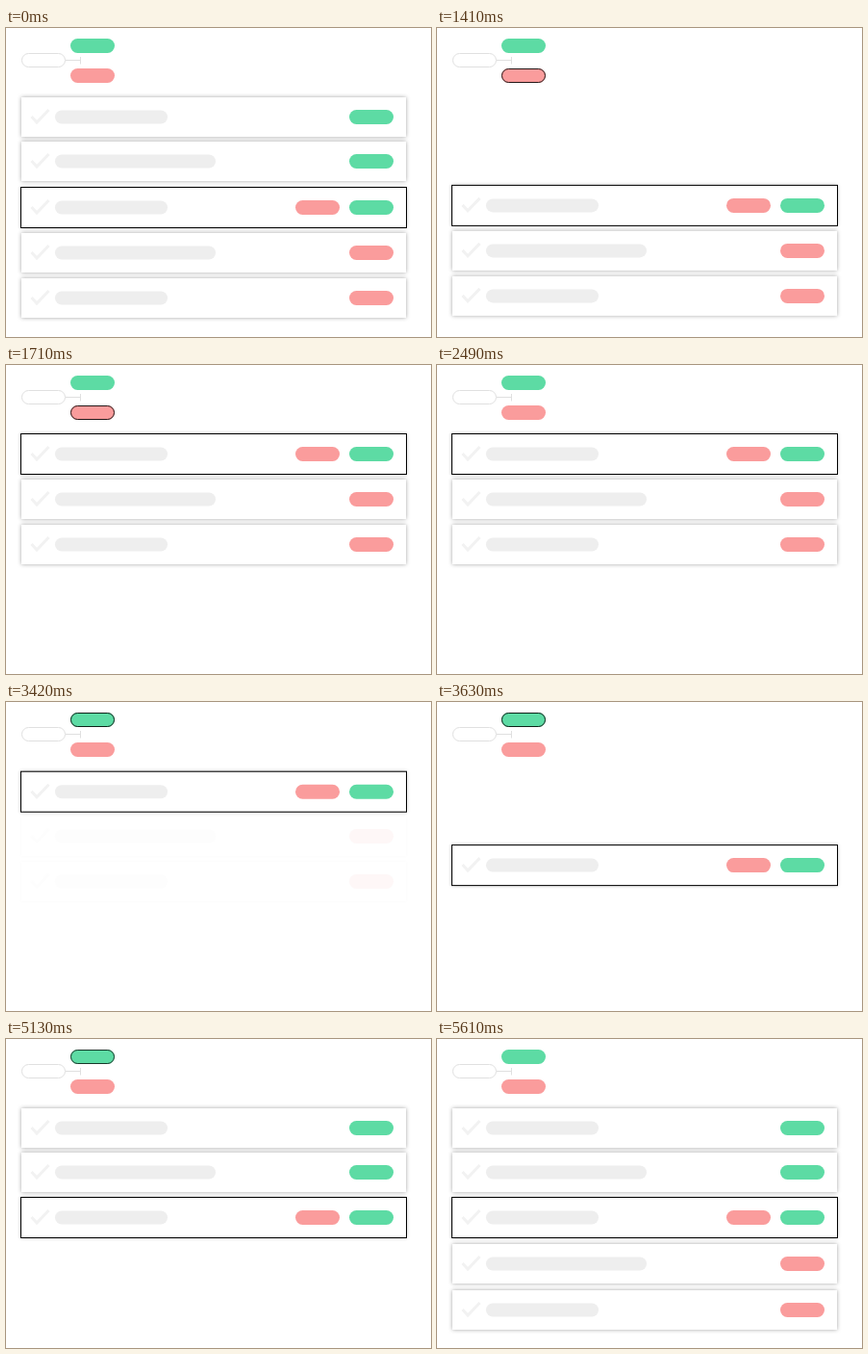
These frames come from a looping animation (442x321 px, 5640 ms). An HTML page:

```html
<!DOCTYPE html>
<html lang="en">
<head>
<meta charset="utf-8">
<title>Filtered list</title>
<style>
  html, body { margin: 0; width: 100%; height: 100%; overflow: hidden; background: #fff; }
  svg { display: block; }
  .green { fill: #5ddba4; }
  .red { fill: #fa9c9c; }
  .bar { fill: #eee; }
  .check { fill: none; stroke: #f2f2f2; stroke-width: 3; }
  .line { fill: none; stroke: #e0e0e0; }
  .ring { fill: none; stroke: #000; stroke-opacity: .85; }
  .sheet { fill: #fff; filter: drop-shadow(0 0 2px rgba(0, 0, 0, .36)); }
  .frame { fill: none; stroke: #000; }
</style>
</head>
<body>
<svg id="stage" width="442" height="321" viewBox="0 0 442 321"></svg>
<script>
const LOOP = 5640, STEP = 30;
const stage = document.getElementById('stage');

function add(parent, tag, attrs) {
  const node = document.createElementNS('http://www.w3.org/2000/svg', tag);
  for (const name in attrs) node.setAttribute(name, attrs[name]);
  return parent.appendChild(node);
}

function rect(parent, cls, x, y, width, height, rx = 0) {
  return add(parent, 'rect', { class: cls, x, y, width, height, rx });
}

const pill = (parent, cls, x, y) => rect(parent, cls, x, y, 46, 15, 7.5);
const ring = (cls, x, y) => rect(stage, cls, x + .5, y + .5, 45, 14, 7);

// A card is drawn around y = 0 so that it can be placed by its centre.
function card(barWidth, tags, framed) {
  const g = add(stage, 'g', {});
  rect(g, 'sheet', 16, -20.5, 400, 41);
  if (framed) rect(g, 'frame', 15.5, -21, 401, 42);
  add(g, 'path', { class: 'check', d: 'M26.5 -.5L32 5.5L44.5 -7.5' });
  rect(g, 'bar', 51, -7, barWidth, 14, 7);
  tags.forEach((tag, i) => pill(g, tag, 357 - 56 * i, -7.5));
  return g;
}

// Header: a node that branches into two filters.
ring('line', 16, 26);
add(stage, 'path', { class: 'line', d: 'M62 33.5H77.5M77.5 30V37.5' });
pill(stage, 'green', 67, 11);
pill(stage, 'red', 67, 42);
const greenRing = ring('ring', 67, 11);
const redRing = ring('ring', 67, 42);

const linear = p => p;
const easeInOut = p => p < .5 ? 2 * p * p : 1 - 2 * (1 - p) ** 2;

// Value at time t along keys of [time, value]; equal times make a hard change.
function track(t, keys, ease = linear) {
  const next = keys.findIndex(key => key[0] > t);
  if (next < 0) return keys[keys.length - 1][1];
  if (next === 0) return keys[0][1];
  const [t0, v0] = keys[next - 1], [t1, v1] = keys[next];
  return v0 + (v1 - v0) * ease((t - t0) / (t1 - t0));
}

const greenFade = [[1115, 1], [1395, 0], [3640, 0], [3900, 1]];
const redFade = [[3140, 1], [3443, 0], [5360, 0], [5610, 1]];
const slide = (from, to, back) =>
  [[1375, from], [1705, to], [3500, to], [3500, back]];

const cards = [
  { node: card(117, ['green']), y: [[0, 92.5]], fade: greenFade },
  { node: card(167, ['green']), y: [[0, 138.5]], fade: greenFade },
  { node: card(167, ['red']), y: slide(233.5, 139.5, 233.5), fade: redFade },
  { node: card(117, ['red']), y: slide(280.5, 186.5, 281.5), fade: redFade },
  { node: card(117, ['green', 'red'], true), fade: [[0, 1]],
    y: [[1375, 186.5], [1705, 92.5], [3400, 92.5], [3725, 185.5]] }
];

const rings = [
  { node: redRing, fade: [[695, 0], [900, 1], [2285, 1], [2490, 0]] },
  { node: greenRing, fade: [[3065, 0], [3270, 1], [5105, 1], [5310, 0]] }
];

function draw(now) {
  const t = Math.floor(now % LOOP / STEP) * STEP;
  for (const { node, y, fade } of cards) {
    node.setAttribute('transform', `translate(0 ${track(t, y, easeInOut)})`);
    node.setAttribute('opacity', track(t, fade));
  }
  for (const { node, fade } of rings) node.setAttribute('opacity', track(t, fade));
}

const start = performance.now();
function tick() {
  draw(performance.now() - start);
  requestAnimationFrame(tick);
}
tick();
</script>
</body>
</html>
```
